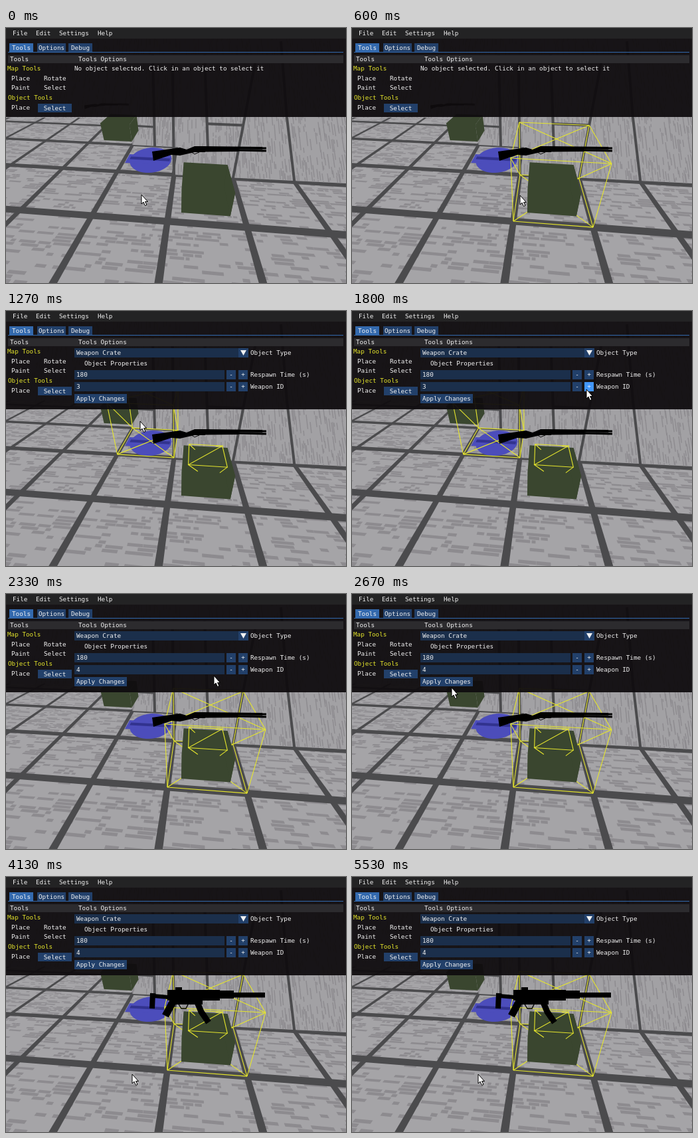
Animation of 512x384 px, one loop 5590 ms. Source, as an HTML page with a canvas:

```html
<!DOCTYPE html>
<html>
<head>
<meta charset="utf-8">
<style>
html, body { margin: 0; width: 100%; height: 100%; overflow: hidden; background: #000; }
canvas { display: block; }
</style>
</head>
<body>
<canvas id="stage" width="512" height="384"></canvas>
<script>
const LOOP = 5590, STEP = 200 / 3;
const YELLOW = '#e6e62c', WHITE = '#f2f2f2', BUTTON = '#22406a', FIELD = '#1b2f4b', HOT = '#4296fa';
const TAB = '#3369ad', FLOOR = '#a5a4a7', STROKE = '#8d8b8f', SEAM = '#4b4b4d', GREEN = '#3a462f', BLUE = '#4c4dbb';

const stage = document.getElementById('stage').getContext('2d');
let ctx = stage;

let seed = 7;
const random = () => (seed = (seed * 16807) % 2147483647) / 2147483647;

// Camera: tile coordinates (u right, v towards the viewer, z up) to the stage.
function project(u, v, z = 0) {
  const w = 1 - 0.02 * u - 0.256 * v - 0.153 * z;
  return [(253 + 82 * u - 72.2 * v - 39.6 * z) / w, (221 + 0.8 * u - 4.5 * v - 100.7 * z) / w];
}

function trace(points) {
  ctx.beginPath();
  for (const point of points) ctx.lineTo(...point);
}
function poly(color, points) {
  trace(points);
  ctx.fillStyle = color;
  ctx.fill();
}
function line(color, width, ...points) {
  trace(points);
  ctx.strokeStyle = color;
  ctx.lineWidth = width;
  ctx.stroke();
}
function box(color, x, y, w, h, r = 0) {
  ctx.fillStyle = color;
  ctx.beginPath();
  ctx.roundRect(x, y, w, h, r);
  ctx.fill();
}
function label(text, x, middle, color = WHITE) {
  ctx.fillStyle = color;
  ctx.font = '9.3px "DejaVu Sans Mono", monospace';
  ctx.fillText(text, x, middle + 3);
}
function button(text, x, y, w, h, color = BUTTON) {
  box(color, x, y, w, h);
  label(text, x + (w - text.length * 5.6) / 2, y + h / 2);
}

const floorRect = (color, u0, v0, u1, v1) =>
  poly(color, [project(u0, v0), project(u1, v0), project(u1, v1), project(u0, v1)]);

function paintFloor() {
  box(FLOOR, 0, 0, 512, 384);
  const plank = 1 / 24;
  for (let v = -2.5; v < 2.2; v += plank) {
    for (let u = -7; u < 5;) {
      const length = 0.04 + random() * 0.25;
      if (random() < 0.5) floorRect(STROKE, u, v, u + length, v + plank * 0.8);
      u += length + random() * 0.1;
    }
  }
  for (let u = -7; u < 5; u++) floorRect(SEAM, u - 0.04, -3, u + 0.04, 2.2);
  for (let v = -2; v < 2; v++) floorRect(SEAM, -7, v - 0.055, 5, v + 0.055);
}

function paintWall() {
  const corner = project(0, 0), inner = project(0, -1), left = project(-1, -1);
  ctx.save();
  poly('#a2a1a4', [[0, 0], [512, 0], project(3, -0.05), corner, inner, left, [187, 135], [0, 135]]);
  ctx.clip();
  for (let x = 0; x < 512; x += 2) {
    for (let y = 0; y < 240;) {
      const length = 4 + random() * 20;
      if (random() < 0.45) line(STROKE, 1.4, [x, y], [x + (x - 290) * length / 1400, y + length]);
      y += length + random() * 8;
    }
  }
  ctx.restore();
  for (const u of [0, 1]) line(SEAM, 4, project(u, 0), project(u, 0, 1.9));
  line(SEAM, 4, project(2, 0), [423, 135], [414, 20]);
  line(SEAM, 4, [304, 181], [299, 40]);
  line(SEAM, 4, [224, 178], [221, 40]);
  line(SEAM, 4, project(0.5, 0, 1), project(1, 0, 1));
  line(SEAM, 3, [189, 147], [223, 149]);
}

function paintDisc() {
  const rim = Array.from({ length: 48 }, (_, i) => {
    const angle = i * Math.PI / 24;
    return project(-0.49 + 0.4 * Math.cos(angle), -0.47 + 0.46 * Math.sin(angle));
  });
  poly(BLUE, rim);
  floorRect(BLUE, -0.95, -0.6, -0.5, -0.28);
  floorRect('#32338f', -0.9, -0.52, -0.12, -0.42);
}

// Cuboid edges and diagonals between corners whose bits stand for u, v and z.
function paintTileHover(u, v) {
  const corner = i => project(u + (i & 1), v + (i >> 1 & 1), i >> 2);
  const edge = (i, j) => line(YELLOW, 1.1, corner(i), corner(j));
  for (let i = 0; i < 8; i++) {
    for (const bit of [1, 2, 4]) if (!(i & bit)) edge(i, i | bit);
  }
  for (const base of [0, 4]) {
    edge(base, base + 3);
    edge(base + 1, base + 2);
  }
  edge(0, 6);
  edge(1, 7);
}

function paintCrate(u, v) {
  const [u0, u1, v0, v1, top] = [u + 0.17, u + 0.82, v + 0.22, v + 0.84, 0.43];
  poly(GREEN, [project(u0, v0, top), project(u1, v0, top), project(u1, v1, top),
    project(u1, v1), project(u0, v1), project(u0, v1, top)]);
  poly(GREEN, [project(u1, v0), project(u1, v0, top), project(u1, v1, top), project(u1, v1)]);
}

function paintSelection() {
  const at = (u, v) => project(u, v, 0.43);
  const [a, b, c, d] = [at(0.25, 0.18), at(0.75, 0.18), at(0.75, 0.68), at(0.25, 0.68)];
  line(YELLOW, 1.1, a, b, c, d, a);
  line(YELLOW, 1.1, at(0.37, 0.8), d, b, at(0.65, 0.2));
  line(YELLOW, 1.1, c, at(0.64, 0.8));
  line(YELLOW, 1.1, a, at(0.34, 0.32));
}

function paintShotgun() {
  poly('#000', [[220, 186], [262, 180], [272, 183], [284, 178], [300, 178], [300, 187], [284, 187], [262, 192], [249, 191], [222, 200]]);
  line('#000', 4, [296, 180], [386, 181]);
  line('#000', 5, [296, 184], [350, 183.5]);
  line('#000', 3, [348, 184], [392, 185]);
  line('#000', 3, [384, 181], [392, 181]);
  line('#000', 1, [278, 186], [284, 190], [293, 186]);
}

function paintSubmachineGun() {
  box('#000', 243, 170, 79, 16);
  box('#000', 320, 171, 23, 12);
  box('#000', 343, 174, 47, 7.5);
  box('#000', 255, 166, 10, 5);
  line('#000', 6, [244, 181], [222, 179]);
  line('#000', 8, [221, 175], [220, 198]);
  line('#000', 11, [254, 183], [240, 209]);
  line('#000', 9, [286, 184], [294, 203], [305, 219]);
  box('#000', 246, 182, 50, 10);
  line('#000', 1.3, [259, 190], [264, 198], [271, 198], [275, 190]);
}

function paintRoom() {
  paintFloor();
  paintWall();
  paintDisc();
  paintCrate(-1.88, -2);
  ctx.save();
  ctx.translate(32, 44);
  ctx.scale(0.39, 0.39);
  paintShotgun();
  ctx.restore();
}

function paintStepper(y, value, name, plusColor) {
  box(FIELD, 103, y, 226, 14);
  label(value, 106, y + 7);
  button('-', 332, y, 14, 14);
  button('+', 350, y, 14, 14, plusColor);
  label(name, 368, y + 7);
}

function paintInterface(selected, weapon, plusHot, applyHot) {
  box('rgba(15,12,14,.94)', 0, 16, 512, selected ? 132 : 118);
  box('#232324', 0, 0, 512, 16);
  label('File', 10, 8);
  label('Edit', 45, 8);
  label('Settings', 80, 8);
  label('Help', 138, 8);

  button('Tools', 5, 23, 36, 13, TAB);
  button('Options', 47, 23, 43, 13);
  button('Debug', 94, 23, 36, 13);
  box(TAB, 3, 36, 505, 1);

  box('#2c2b2e', 3, 41, 505, 12);
  label('Tools', 6, 47);
  label('Tools Options', 109, 47);
  label('Map Tools', 2, 61, YELLOW);
  label('Place', 8, 76);
  label('Rotate', 57, 76);
  label('Paint', 8, 90);
  label('Select', 57, 90);
  label('Object Tools', 3, 105, YELLOW);
  label('Place', 8, 120);
  button('Select', 48, 114, 51, 13);

  if (!selected) {
    label('No object selected. Click in an object to select it', 103, 61);
    return;
  }
  box(FIELD, 103, 56, 262, 14);
  box(BUTTON, 350, 56, 15, 14);
  poly(WHITE, [[353, 59], [362, 59], [357.5, 67]]);
  label('Weapon Crate', 106, 63);
  label('Object Type', 368, 63);
  label('Object Properties', 118, 79);
  paintStepper(89, '180', 'Respawn Time (s)');
  paintStepper(107, weapon, 'Weapon ID', plusHot ? HOT : BUTTON);
  button('Apply Changes', 103, 125, 79, 14, applyHot ? HOT : BUTTON);
}

// Cursor moves: start, end, destination
const moves = [
  [270, 800, 276, 252], [1000, 1270, 202, 166], [1400, 1800, 353, 118],
  [2200, 2670, 150, 141], [2670, 2870, 147, 131], [3870, 4130, 190, 297]
];
function cursorAt(t) {
  let x = 204, y = 251;
  for (const [start, end, toX, toY] of moves) {
    const u = Math.min(1, Math.max(0, (t - start) / (end - start)));
    const eased = u * u * (3 - 2 * u);
    x += (toX - x) * eased;
    y += (toY - y) * eased;
  }
  return [x, y];
}
function paintCursor(x, y) {
  ctx.save();
  ctx.translate(Math.round(x), Math.round(y));
  const arrow = [[0, 0], [0, 14], [3, 11], [5.5, 16.5], [8, 15.5], [5.5, 10.5], [9.5, 10.5], [0, 0]];
  poly('#fff', arrow);
  line('#000', 1, ...arrow);
  ctx.restore();
}

const room = document.createElement('canvas');
room.width = 512;
room.height = 384;
ctx = room.getContext('2d');
paintRoom();
ctx = stage;

function draw(now) {
  const t = Math.floor((now % LOOP + 5) / STEP) * STEP;
  const during = (from, to = LOOP + STEP) => t >= from && t < to;
  const selected = during(990);

  ctx.drawImage(room, 0, 0);
  if (during(590, 1190) || during(2320)) paintTileHover(0, 0);
  if (during(1190, 2320)) paintTileHover(-1, -1);
  paintCrate(0, 0);
  if (selected) paintSelection();
  if (during(2990)) paintSubmachineGun();
  else paintShotgun();
  paintInterface(selected, during(2120) ? '4' : '3', during(1720, 2260), during(2720, 3920));
  paintCursor(...cursorAt(t));
  requestAnimationFrame(draw);
}
requestAnimationFrame(draw);
</script>
</body>
</html>
```
